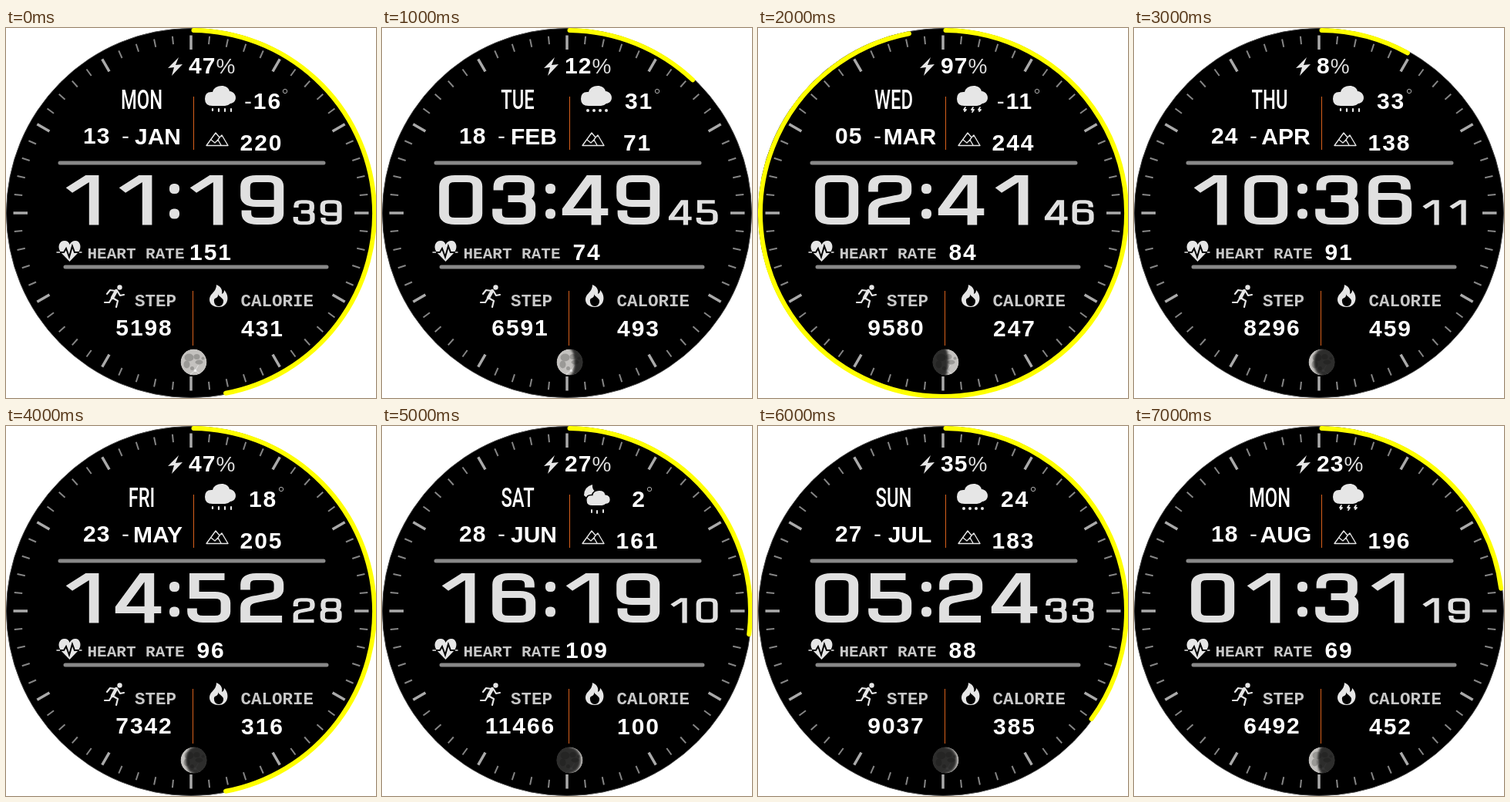
Recreate the animation shown at these times as an HTML page. Size 480 by 480 pixels, loop 8000 ms.

```html
<!DOCTYPE html>
<html lang="en">
<head>
<meta charset="utf-8">
<title>Watch face</title>
<style>
html, body { margin: 0; width: 100%; height: 100%; overflow: hidden; background: #fff; }
svg { display: block; width: 100%; height: 100%; }
text { fill: #fff; font: bold 30px "Liberation Sans", Arial, sans-serif; }
.num { letter-spacing: 1.9px; text-anchor: middle; }
.mid { text-anchor: middle; }
.thin { font-weight: 400; fill: #ddd; }
.label { font: bold 22.5px "Liberation Mono", monospace; fill: #c8c8c8; }
.day { font: 500 35px Roboto, sans-serif; text-anchor: middle; }
.digits { fill: none; stroke: #e0e0e0; stroke-width: 9; }
.icon { fill: #e6e6e6; }
.line { fill: none; stroke: #e6e6e6; stroke-linecap: round; stroke-linejoin: round; }
#shade { filter: blur(1.5px); }
</style>
</head>
<body>
<svg viewBox="0 0 480 480" role="img" aria-label="Watch face">
  <defs>
    <path id="cloud" d="M268 101Q258 101 258 92Q258 82 268 83C270 73 288 72 290 82C300 83 301 97 291 98Q288 101 284 101Z"/>
    <clipPath id="disc"><circle r="17"/></clipPath>
  </defs>
  <circle cx="240" cy="240" r="239.500" stroke="#444"/>
  <g id="ticks"></g>
  <path id="arc" fill="none" stroke="#ff0" stroke-width="6" stroke-linecap="round"/>

  <path class="icon" d="M224 38L210 52L218 51L215 62L229 47L220 48Z"/>
  <text x="237" y="59" style="letter-spacing:1px"><tspan id="battery"></tspan><tspan class="thin" font-size="28">%</tspan></text>

  <text id="day" class="day" transform="translate(176 105) scale(.68 1)"></text>
  <text id="date" x="100" y="150" style="letter-spacing:1px"></text>
  <text class="thin" x="150" y="150">-</text>
  <text id="month" class="mid" x="197" y="150.500"></text>

  <g id="weather"></g>
  <text id="temp" class="num" x="333.500" y="104.500"></text>
  <circle id="degree" cy="82" r="2.700" fill="none" stroke="#aaa"/>
  <path class="line" stroke-width="1.400" d="M260 152.500L272 136L277 142L280 139L288 152.500ZM266 145L271 149L275 145L279 152M275 145L277 142"/>
  <text id="height" class="num" x="331.500" y="158.500"></text>

  <path d="M243.500 89V158M242.500 341V412" stroke="#d8601c"/>
  <path d="M70 175H412M77 310H416" stroke="#888" stroke-width="5" stroke-linecap="round"/>

  <g id="clock" class="digits"></g>
  <g fill="#e0e0e0">
    <rect x="212" y="202" width="13" height="13" rx="5.500"/>
    <rect x="212" y="234.500" width="13" height="13" rx="5.500"/>
  </g>

  <path class="icon" d="M82.500 303L71 291C66 284 69 276 76 276Q81 276 82.500 281Q85 276 90 276C96 276 99 284 94 291Z"/>
  <path class="line" stroke-width="1.500" d="M66 291H72M93 291H98"/>
  <path d="M70 291H75L78 286L82 297L86 283L89 291H95" fill="none" stroke="#000" stroke-width="2"/>
  <text class="label" x="105.500" y="298.500" style="font-size:21px">HEART RATE</text>
  <text id="pulse" class="num" x="266" y="300.500"></text>

  <circle class="icon" cx="147.500" cy="336.500" r="3.200"/>
  <g class="line">
    <path d="M143 341L138 350" stroke-width="4.500"/>
    <path d="M142 341L135 340L131 345M145 342L148 347L153 346M138 350L145 354L143 362M137 351L134 356L128 356" stroke-width="2.200"/>
  </g>
  <text class="label" x="167" y="360.500">STEP</text>
  <text id="steps" class="num" x="179.500" y="398.500"></text>

  <path class="icon" d="M273 333C280 336 281 341 280 345Q283 344 283 340C291 348 288 362 276 362C263 362 261 350 268 344Q273 339 273 333Z"/>
  <path d="M275 344C275 349 283 350 282 355A6 6 0 0 1 270 355Q269 351 273 350Q276 348 275 344Z"/>
  <text class="label" x="304.500" y="360.500">CALORIE</text>
  <text id="calories" class="num" x="333" y="400"></text>

  <g transform="translate(243.500 433.500)" clip-path="url(#disc)">
    <circle r="17" fill="#c4c2bf"/>
    <g fill="#8d8b89" opacity=".75">
      <ellipse cx="-6" cy="-6" rx="6" ry="5"/>
      <ellipse cx="4" cy="-7" rx="4" ry="3.500"/>
      <ellipse cx="-9" cy="3" rx="4" ry="5"/>
      <ellipse cx="7" cy="0" rx="5" ry="3"/>
      <circle cx="12" cy="-5" r="2"/>
      <circle cx="-2" cy="8" r="2.500"/>
    </g>
    <path d="M2 11L-5 16M2 11L8 15M2 11L6 4" stroke="#eee" stroke-width=".8"/>
    <circle cx="2" cy="11" r="1.700" fill="#f4f4f4"/>
    <path id="shade" fill="#080808" opacity=".8"/>
  </g>
</svg>
<script>
const $ = id => document.getElementById(id);

// Centre lines of the wide numerals, drawn in a 31 x 55 box.
const glyphs = [
  'M10 0H21Q31 0 31 10V45Q31 55 21 55H10Q0 55 0 45V10Q0 0 10 0Z',
  'M1 15L18 0H24V60',
  'M0 17V10Q0 0 10 0H21Q31 0 31 10V16Q31 25 21 26L10 29Q0 31 0 40V55H34',
  'M1 15V10Q1 0 11 0H20Q30 0 30 9V17Q30 26 21 26H10M21 26Q31 27 31 36V45Q31 55 21 55H10Q0 55 0 45V39',
  'M37 43H-1V40L20 0H26V60',
  'M30 0H2V24H21Q31 24 31 34V45Q31 55 21 55H10Q0 55 0 45V41',
  'M30 14V10Q30 0 20 0H10Q0 0 0 10V45Q0 55 10 55H21Q31 55 31 45V33Q31 23 21 23H0',
  'M-4 0H31V6L11 60',
  'M10 0H21Q30 0 30 10V17Q30 26 21 26H10Q1 26 1 17V10Q1 0 10 0ZM10 26H21Q31 27 31 36V45Q31 55 21 55H10Q0 55 0 45V36Q0 27 10 26',
  'M1 41V45Q1 55 11 55H21Q31 55 31 45V10Q31 0 21 0H10Q0 0 0 10V22Q0 32 10 32H31'
];
const slots = [74, 143, 235, 304, 372.5, 407.5];

const fall = {
  rain: '<path class="line" stroke-width="2.200" d="M268 105V107M276 105V108M284 105V108M292 105V108"/>',
  snow: [267, 275, 283, 291].map(x => `<circle class="icon" cx="${x}" cy="107" r="2"/>`).join(''),
  storm: '<path class="line" stroke-width="1.800" d="M269 103L267 106H270L268 108M279 103L277 106H280L278 109M288 103L286 106H289L287 108"/>'
};
const cloud = '<use href="#cloud" class="icon"/>';
const sky = {
  rain: cloud + fall.rain,
  snow: cloud + fall.snow,
  storm: cloud + fall.storm,
  night: '<path class="icon" d="M273 76Q262 79 262 90L267 94L283 86Q272 86 273 76Z"/>' +
    '<use href="#cloud" class="icon" stroke="#000" stroke-width="2" transform="translate(61 24) scale(.79)"/>' +
    '<path class="line" stroke-width="2" d="M272 109V112M279 110V113M287 109V112"/>'
};

// moon: lit share, negative while waning
const keys = 'battery day date month weather temp height time pulse steps calories moon'.split(' ');
const scenes = `47 MON 13 JAN rain -16 220 111939 151 5198 431 1
12 TUE 18 FEB snow 31 71 034945 74 6591 493 -.68
97 WED 05 MAR storm -11 244 024146 84 9580 247 .4
8 THU 24 APR rain 33 138 103611 91 8296 459 -.2
47 FRI 23 MAY rain 18 205 145228 96 7342 316 -.2
27 SAT 28 JUN night 2 161 161910 109 11466 100 .08
35 SUN 27 JUL snow 24 183 052433 88 9037 385 .08
23 MON 18 AUG storm . 196 013119 69 6492 452 -.35`
  .split('\n').map(row => Object.fromEntries(row.split(' ').map((v, i) => [keys[i], v])));

$('ticks').innerHTML = Array.from({ length: 60 }, (_, i) => {
  const major = i % 5 === 0;
  return `<path d="M240 ${major ? 28 : 20}V9.500" transform="rotate(${i * 6} 240 240)"
    stroke="${major ? '#aaa' : '#858585'}" stroke-width="${major ? 3.5 : 2}"/>`;
}).join('');

function arcPath(percent) {
  const a = percent / 100 * 2 * Math.PI, c = 240.5, r = 237.5;
  const x = c + r * Math.sin(a), y = c - r * Math.cos(a);
  return `M${c + 3} ${c - r}A${r} ${r} 0 ${percent > 50 ? 1 : 0} 1 ${x} ${y}`;
}

function digit(d, i) {
  const small = i > 3, k = small ? .5 : 1;
  return `<path d="${glyphs[d]}" transform="translate(${slots[i] + 6.5 * k} ${small ? 225.5 : 195.5}) scale(${1.4 * k} ${k})"/>`;
}

// The half plane right of the terminator; the disc clips its outer edge.
function shadow(lit) {
  const k = Math.abs(lit), rx = 17 * Math.abs(2 * k - 1);
  return k === 1 ? '' : `M0 -30H40V30H0V17A${rx} 17 0 0 ${k > .5 ? 0 : 1} 0 -17Z`;
}

function show(s) {
  for (const k of ['battery', 'day', 'date', 'month', 'height', 'pulse', 'steps', 'calories'])
    $(k).textContent = s[k];
  $('arc').setAttribute('d', arcPath(+s.battery));
  $('weather').innerHTML = sky[s.weather];
  const hasTemp = s.temp !== '.';
  $('temp').innerHTML = hasTemp ? s.temp.replace('-', '<tspan class="thin">-</tspan>') : '';
  $('degree').setAttribute('cx', 333 + [0, 14, 24, 29][s.temp.length]);
  $('degree').style.display = hasTemp ? '' : 'none';
  $('clock').innerHTML = [...s.time].map(digit).join('');
  $('shade').setAttribute('d', shadow(+s.moon));
  $('shade').setAttribute('transform', s.moon > 0 ? 'scale(-1 1)' : '');
}

let current = -1;
function tick() {
  const i = Math.floor(performance.now() / 1000) % scenes.length;
  if (i !== current) show(scenes[current = i]);
  requestAnimationFrame(tick);
}
tick();
</script>
</body>
</html>
```
